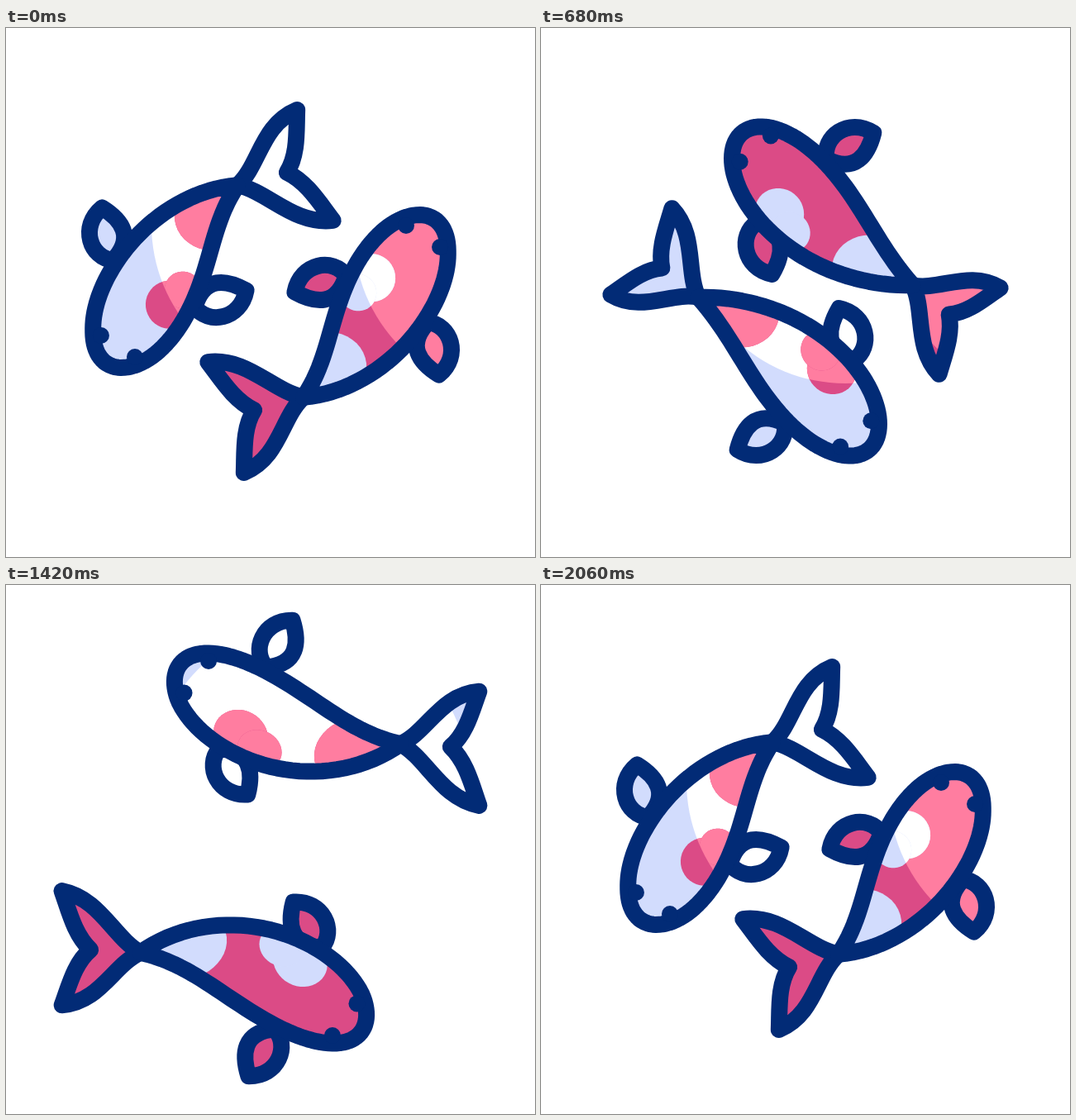
An HTML page with a canvas for the animation above (2400 ms loop, 640x640 px).

```html
<!DOCTYPE html>
<html lang="en">
<head>
<meta charset="utf-8">
<title>Two koi</title>
<style>
  html, body { margin: 0; width: 100%; height: 100%; overflow: hidden; background: #fff; }
  canvas { display: block; width: 640px; height: 640px; }
</style>
</head>
<body>
<canvas id="pond" width="640" height="640"></canvas>
<script>
const ctx = document.getElementById('pond').getContext('2d');
const LOOP = 2400, SWIM = 2060, RAD = Math.PI / 180;
const CENTER = { x: 321, y: 320 };
const INK = '#022b76';
const PALE = ['#ffffff', '#d2dcfd'];   // lit, shaded
const PINK = ['#ff7da0', '#db4b86'];

// Pose tracks, in degrees and pixels, on top of one steady eased lap.
const TIMES = [0, 320, 680, 1200, 1420, 1740, 2060];
const TRACKS = {
  lead:       [0, 2.8, -1.3, 4.4, 6.9, -0.7, 0],
  headRadius: [196.6, 190, 181, 221, 227.6, 202, 196.6],
  heading:    [-38.3, -24.9, -20.7, -37.3, -29.1, -36.7, -38.3],
  jointLag:   [91.8, 96.1, 106.8, 77.5, 74.2, 88.6, 91.8],
  jointRadius:[136, 150, 131, 176, 202, 150, 136],
  tail:       [0, -38, -38, -32, -61, -15, 0],
  tailSize:   [1.1, 1, 1, 0.99, 1.08, 1.01, 1.1],
  finRoot:    [88, 68, 66, 74, 63, 79, 88],
  finRight:   [41, 77, 77, 65, 91, 51, 41],
  finLeft:    [43, 31, 26, 34, 28, 39, 43]
};

// Cubic Hermite through the keys, at rest at both ends.
function sample(keys, t) {
  const last = TIMES.length - 1;
  const slope = i => i <= 0 || i >= last ? 0 :
    (keys[i + 1] - keys[i - 1]) / (TIMES[i + 1] - TIMES[i - 1]);
  let i = 0;
  while (i < last - 1 && t > TIMES[i + 1]) i++;
  const span = TIMES[i + 1] - TIMES[i], x = (t - TIMES[i]) / span;
  const x2 = x * x, x3 = x2 * x;
  return keys[i] * (2 * x3 - 3 * x2 + 1) + keys[i + 1] * (3 * x2 - 2 * x3) +
    span * (slope(i) * (x3 - 2 * x2 + x) + slope(i + 1) * (x3 - x2));
}

const polar = (origin, radius, deg) => ({
  x: origin.x + radius * Math.cos(deg * RAD),
  y: origin.y + radius * Math.sin(deg * RAD)
});

const bezier = (a, b, c, d, t) => {
  const u = 1 - t;
  return u * u * u * a + 3 * u * u * t * b + 3 * u * t * t * c + t * t * t * d;
};
const bezierSlope = (a, b, c, d, t) => {
  const u = 1 - t;
  return u * u * (b - a) + 2 * u * t * (c - b) + t * t * (d - c);
};

// Half outline of the body as [distance behind the eyes, half width].
const halfBody = [];
for (let i = 0; i <= 24; i++) {
  const t = i / 24;
  halfBody.push([bezier(-25, -25, 15, 72, t), bezier(0, 28, 53, 53, t)]);
}
for (let i = 1; i <= 24; i++) {
  const t = i / 24;
  halfBody.push([bezier(72, 130, 185, 250, t), bezier(53, 53, 30, 0, t)]);
}
const bodyOutline = halfBody.concat(
  halfBody.slice(1, -1).reverse().map(([s, w]) => [s, -w]));

function disc(s, w, r) {
  const points = [];
  for (let i = 0; i < 40; i++) {
    const a = i / 40 * 2 * Math.PI;
    points.push([s + r * Math.cos(a), w + r * Math.sin(a)]);
  }
  return points;
}
const spots = [disc(75, -29, 29), disc(99, -35, 23), disc(197, -10, 44)];

const TAIL = new Path2D(`M0 0C30 -15 45 -58 88 -64C80 -42 74 -16 56 0
  C74 16 80 42 88 64C45 58 30 15 0 0Z`);
const FIN = new Path2D('M0 0C8 -26 48 -32 65 0C46 20 22 32 0 0Z');

function getPose(t) {
  const p = {};
  for (const name in TRACKS) p[name] = sample(TRACKS[name], t);
  const lap = -180 * (1 - Math.cos(Math.PI * t / SWIM));
  const angle = 160.7 + lap + p.lead;
  p.head = polar(CENTER, p.headRadius, angle);
  p.joint = polar(CENTER, p.jointRadius, angle + p.jointLag);
  p.back = angle + p.heading + 180;
  p.tailAngle = -18 + lap + p.tail;
  return p;
}

// Maps body coordinates onto the bent spine.
function makeSpine(p) {
  const a = p.head, d = p.joint;
  const reach = Math.hypot(d.x - a.x, d.y - a.y) / 3;
  const b = polar(a, reach, p.back);
  const c = polar(d, -reach, p.tailAngle - 12);
  return (s, w) => {
    const t = Math.min(1, Math.max(0, s / 250));
    const extra = s - t * 250;
    const dx = bezierSlope(a.x, b.x, c.x, d.x, t);
    const dy = bezierSlope(a.y, b.y, c.y, d.y, t);
    const len = Math.hypot(dx, dy), ux = dx / len, uy = dy / len;
    return {
      x: bezier(a.x, b.x, c.x, d.x, t) + ux * extra + uy * w,
      y: bezier(a.y, b.y, c.y, d.y, t) + uy * extra - ux * w,
      angle: Math.atan2(uy, ux)
    };
  };
}

function toPath(points, spine) {
  const path = new Path2D();
  for (const [s, w] of points) {
    const q = spine(s, w);
    path.lineTo(q.x, q.y);
  }
  path.closePath();
  return path;
}

function place(shape, x, y, angle, sx = 1, sy = 1, shear = 0) {
  const m = new DOMMatrix([1, 0, 0, 1, x, y]);
  m.rotateSelf(angle / RAD).multiplySelf(new DOMMatrix([sx, shear, 0, sy, 0, 0]));
  const path = new Path2D();
  path.addPath(shape, m);
  return path;
}

function paint(path, [lit, shaded], light) {
  ctx.fillStyle = shaded;
  ctx.fill(path);
  ctx.save();
  ctx.clip(light);
  ctx.fillStyle = lit;
  ctx.fill(path);
  ctx.restore();
}

function drawFish(p, skin, marks, lightX, lightY) {
  const spine = makeSpine(p);
  const light = new Path2D();
  light.arc(lightX, lightY, 192, 0, 2 * Math.PI);

  for (const side of [1, -1]) {
    const root = spine(p.finRoot, 57 * side);
    const spread = (side > 0 ? p.finRight : p.finLeft) * RAD;
    const fin = place(FIN, root.x, root.y, root.angle - side * spread, 1, side);
    paint(fin, skin, light);
    ctx.stroke(fin);
  }

  const k = p.tailSize;
  const tail = place(TAIL, p.joint.x, p.joint.y, p.tailAngle * RAD, k, k, 0.06 * k);
  paint(tail, skin, light);
  ctx.stroke(tail);

  const body = toPath(bodyOutline, spine);
  paint(body, skin, light);
  ctx.save();
  ctx.clip(body);
  for (const spot of spots) paint(toPath(spot, spine), marks, light);
  ctx.restore();
  ctx.stroke(body);

  ctx.fillStyle = INK;
  for (const side of [1, -1]) {
    const eye = spine(0, 24.3 * side);
    ctx.beginPath();
    ctx.arc(eye.x, eye.y, 10, 0, 2 * Math.PI);
    ctx.fill();
  }
}

function draw(t) {
  const pose = getPose(Math.min(t, SWIM));
  ctx.setTransform(1, 0, 0, 1, 0, 0);
  ctx.fillStyle = '#fff';
  ctx.fillRect(0, 0, 640, 640);
  ctx.strokeStyle = INK;
  ctx.lineWidth = 20;
  ctx.lineJoin = ctx.lineCap = 'round';
  drawFish(pose, PALE, PINK, 368, 238);
  // The second koi is the first one turned half way round.
  ctx.setTransform(-1, 0, 0, -1, 640, 637);
  drawFish(pose, PINK, PALE, 27, 387);
}

const start = performance.now();
function tick() {
  draw((performance.now() - start) % LOOP);
  requestAnimationFrame(tick);
}
tick();
</script>
</body>
</html>
```
